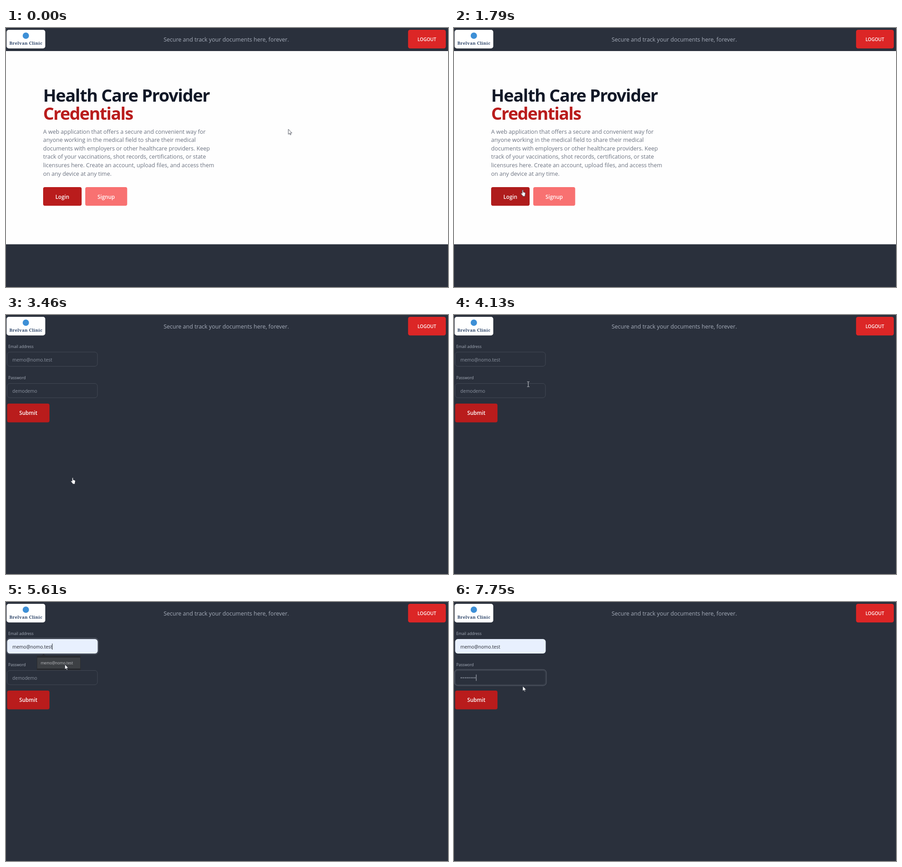
Recreate the animation shown at these times as an HTML page. Size 976x573 px, loop 8000 ms.

```html
<!DOCTYPE html>
<html lang="en">
<head>
<meta charset="utf-8">
<title>Sign in walkthrough</title>
<style>
html, body { margin: 0; width: 100%; height: 100%; overflow: hidden; background: #2a303c; }
svg { display: block; width: 976px; height: 573px; font-family: "Open Sans", "Noto Sans", sans-serif; }
text { white-space: pre; }

.tagline { font-size: 12.5px; fill: #a6adba; }
.title { font-size: 38px; font-weight: 700; fill: #111827; letter-spacing: -1.3px; }
.title.red { fill: #b91c1c; letter-spacing: -1.65px; }
.copy { font-size: 12.5px; fill: #6b7280; }
.btn { font-size: 11.7px; font-weight: 600; fill: #fff; text-anchor: middle; }
.btn.small { font-size: 10px; }
.brand { font: 600 9.6px "Noto Serif", serif; letter-spacing: .3px; fill: #2c4468; text-anchor: middle; }
.label { font-size: 8.6px; fill: #a6adba; }
.value { font-size: 10.15px; fill: #8c93a0; }
.dots { letter-spacing: .53px; fill: #a6adba; }
.field { fill: #2a303c; stroke: #434955; }
.ring { fill: none; stroke: #505662; stroke-width: 1.3; }

.step { animation: 8s step-end infinite; }
.fade { animation: 8s linear infinite; }

#home { animation-name: home; }
@keyframes home { 0% { opacity: 1 } 43.25%, 100% { opacity: 0 } }
#login { animation-name: hover; }
@keyframes hover { 0%, 22% { fill: #b91c1c } 23.25%, 100% { fill: #991b1b } }

#emailFocus { animation-name: emailFocus; }
@keyframes emailFocus { 0% { opacity: 0 } 59.25% { opacity: 1 } 77.25%, 100% { opacity: 0 } }
#emailCaret { animation-name: emailCaret; }
@keyframes emailCaret {
  0% { transform: none; fill: #c3c8d1 }
  69.25%, 100% { transform: translateX(88px); fill: #20242c }
}
#filled { animation-name: filled; }
@keyframes filled { 0% { opacity: 0 } 65%, 100% { opacity: 1 } }
#popup { animation-name: popup; }
@keyframes popup { 0%, 59.25% { opacity: 0 } 60%, 69.5% { opacity: 1 } 71.875%, 100% { opacity: 0 } }
#choice { animation-name: filled; }

#passFocus { animation-name: passFocus; }
@keyframes passFocus { 0% { opacity: 0 } 77.25%, 100% { opacity: 1 } }
#hint { animation-name: hint; }
@keyframes hint { 0% { opacity: 1 } 85.25%, 100% { opacity: 0 } }
#typed { animation-name: typed; }
@keyframes typed { 0% { opacity: 0 } 85.25%, 100% { opacity: 1 } }
#typing { animation-name: typing; }
@keyframes typing {
  0% { transform: none }
  85.25% { transform: translateX(4.35px) }
  86% { transform: translateX(8.7px) }
  89.375% { transform: translateX(13.05px) }
  91% { transform: translateX(17.4px) }
  92.75% { transform: translateX(21.75px) }
  93.5% { transform: translateX(26.1px) }
  96.125% { transform: translateX(30.45px) }
  96.875%, 100% { transform: translateX(34.8px) }
}
#passCaret { animation-name: blink; }
@keyframes blink { 0% { opacity: 0 } 77.25% { opacity: 1 } 83.5% { opacity: 0 } 85.25%, 100% { opacity: 1 } }

#pointer { animation-name: move; }
@keyframes move {
  0% { transform: translate(623.5px, 224px) }
  6.25% { transform: translate(623.5px, 224px); animation-timing-function: cubic-bezier(.45, .2, .8, .75) }
  14% { transform: translate(410px, 274px) }
  15.625% { transform: translate(343px, 288px) }
  16.5% { transform: translate(342px, 288px); animation-timing-function: cubic-bezier(.25, .3, .6, 1) }
  23.25%, 44% { transform: translate(146px, 360px); animation-timing-function: cubic-bezier(.3, .1, .6, 1) }
  53.25%, 54.25% { transform: translate(165px, 141px) }
  56.5%, 62.5% { transform: translate(153px, 98px) }
  65% { transform: translate(148px, 124px) }
  67.5% { transform: translate(136px, 146px) }
  70.125%, 72.75% { transform: translate(130px, 138px) }
  74.5% { transform: translate(142px, 185px) }
  75.5% { transform: translate(150px, 208px) }
  77.25%, 78.75% { transform: translate(153px, 176px) }
  80.125%, 100% { transform: translate(151.7px, 186px) }
}
#arrow { animation-name: arrow; }
@keyframes arrow {
  0%, 20.5%, 44%, 52.1%, 64.2%, 74.4%, 79.7%, 100% { opacity: 1 }
  12.5%, 22%, 50.75%, 55.75%, 73.3%, 76.9% { opacity: 0 }
}
#beam { animation-name: beam; }
@keyframes beam {
  0%, 20.5%, 52.1%, 64.2%, 74.4%, 79.7%, 100% { opacity: 0 }
  12.5%, 50.75%, 55.75%, 73.3%, 76.9% { opacity: 1 }
}
#beam path { animation-name: ink; }
@keyframes ink { 0% { stroke: #222 } 43.25%, 100% { stroke: #d5d8dd } }
#hand { animation-name: hand; }
@keyframes hand { 0% { opacity: 0 } 22% { opacity: 1 } 44%, 100% { opacity: 0 } }
</style>
</head>
<body>
<svg viewBox="0 0 976 573">
  <rect width="976" height="573" fill="#2a303c"/>

  <!-- Sign-in form -->
  <text class="label" x="5" y="73">Email address</text>
  <rect class="field" x="2.5" y="82" width="199.5" height="31.5" rx="6"/>
  <text class="value" x="14" y="102.5">memo@nomo.test</text>
  <g id="filled" class="step">
    <rect x="2.5" y="82" width="200" height="32" rx="6" fill="#e8f0fe"/>
    <text class="value" x="14" y="102.5" style="fill:#23272f">memo@nomo.test</text>
  </g>
  <g id="emailFocus" class="step">
    <rect class="ring" x="1" y="80" width="203" height="35.5" rx="7.5"/>
    <rect id="emailCaret" class="step" x="13.7" y="92" width="1" height="13.5"/>
  </g>

  <text class="label" x="5" y="142.3">Password</text>
  <rect class="field" x="2.5" y="151.5" width="199.5" height="31.5" rx="6"/>
  <text id="hint" class="value step" x="14" y="171.7">demodemo</text>
  <text id="typed" class="value dots step" x="14" y="171.7">••••••••</text>
  <g id="passFocus" class="step">
    <rect class="ring" x="1" y="149.5" width="203" height="35.5" rx="7.5"/>
    <g id="typing" class="step">
      <g id="passCaret" class="step"><rect x="13.8" y="160.5" width="1" height="14" fill="#c3c8d1"/></g>
    </g>
  </g>

  <rect x="2.5" y="196" width="93.5" height="41.5" rx="4" fill="#b91c1c"/>
  <text class="btn" x="49.3" y="221.3">Submit</text>

  <g id="popup" class="fade">
    <path d="M78 119.5L83 115l5 4.5z" fill="#28292b"/>
    <rect x="68" y="119" width="97" height="32" rx="1" fill="#28292b"/>
    <rect id="choice" class="step" x="69" y="123" width="95" height="24" fill="#454648"/>
    <text x="76.7" y="137.6" font-size="8.2" fill="#f4f4f4">memo@nomo.test</text>
  </g>

  <!-- Landing page -->
  <g id="home" class="step">
    <rect y="51" width="976" height="427.5" fill="#fefefe"/>
    <text class="title" x="82" y="163">Health Care Provider</text>
    <text class="title red" x="82" y="203">Credentials</text>
    <text class="copy">
      <tspan x="82" y="233.5">A web application that offers a secure and convenient way for</tspan>
      <tspan x="82" dy="18.65">anyone working in the medical field to share their medical</tspan>
      <tspan x="82" dy="18.65">documents with employers or other healthcare providers. Keep</tspan>
      <tspan x="82" dy="18.65">track of your vaccinations, shot records, certifications, or state</tspan>
      <tspan x="82" dy="18.65">licensures here. Create an account, upload files, and access them</tspan>
      <tspan x="82" dy="18.65">on any device at any time.</tspan>
    </text>
    <rect id="login" class="fade" x="82" y="352" width="85" height="41.3" rx="4" fill="#b91c1c"/>
    <text class="btn" x="124.3" y="377.5">Login</text>
    <rect x="175" y="352" width="92.6" height="41.3" rx="4" fill="#f87171"/>
    <text class="btn" x="221.2" y="377.5">Signup</text>
  </g>

  <!-- Header -->
  <rect x="1.3" y="4" width="85.4" height="41.3" rx="5" fill="#fff"/>
  <circle cx="43.8" cy="17" r="7" fill="#3d8fd6"/>
  <text class="brand" x="44" y="37">Brelvan Clinic</text>
  <text class="tagline" x="348" y="30">Secure and track your documents here, forever.</text>
  <rect x="887.8" y="4" width="83.4" height="41.2" rx="4.5" fill="#dc2626"/>
  <text class="btn small" x="929.3" y="28.7">LOGOUT</text>

  <g id="pointer" class="fade">
    <path id="arrow" class="step" d="M0 0V11.2L2.6 8.8 4.2 12.5 5.9 11.8 4.3 8.2H7.8Z" fill="#fff" stroke="#1d2230" stroke-width=".8"/>
    <g id="beam" class="step">
      <path class="step" d="M-2.5-5.5H-.8L0-4.8 .8-5.5H2.5M0-4.8V4.8M-2.5 5.5H-.8L0 4.8 .8 5.5H2.5" fill="none"/>
    </g>
    <path id="hand" class="step" d="M0 .6Q1.1-1.2 2.2 .6V4.6L5.6 5.4Q7.4 5.9 7.1 8L6.3 11.6V14H.9V12.4L-2.9 8.2Q-3 6.5-1.4 6.9L0 8Z" fill="#fff" stroke="#1d2230" stroke-width=".8"/>
  </g>
</svg>
</body>
</html>
```
